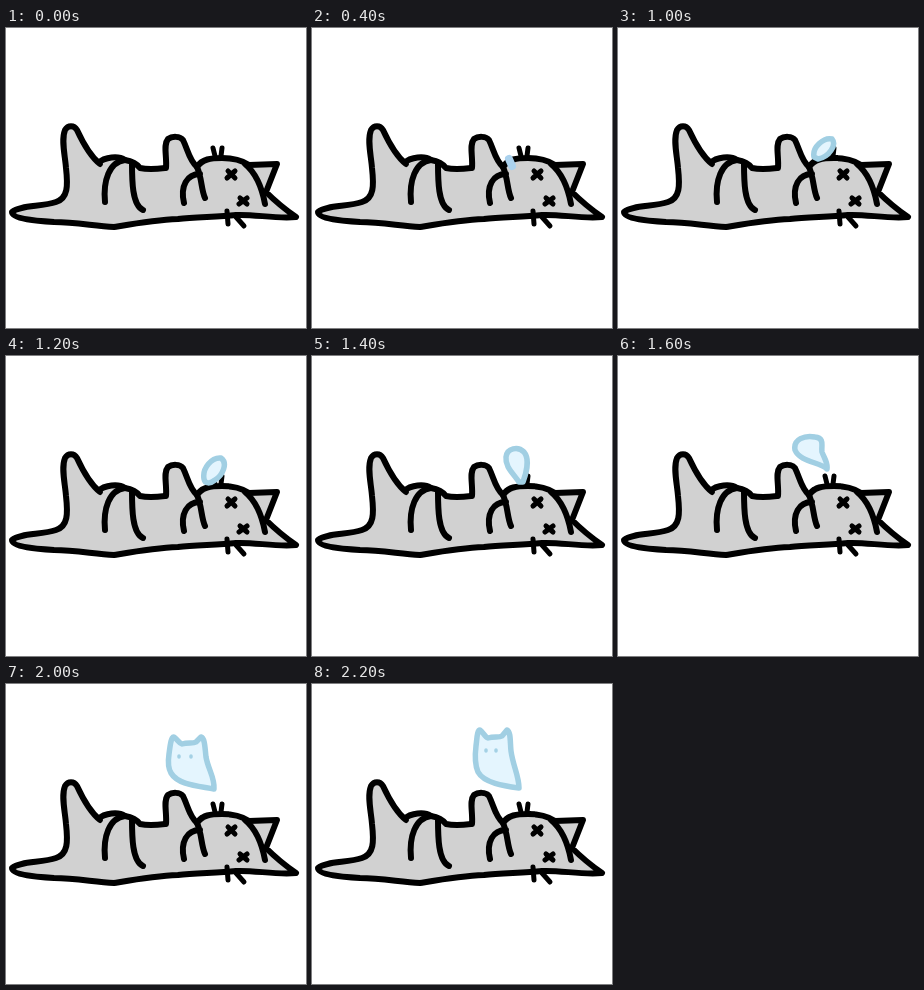
Animation of 300 by 300 pixels, one loop 2400 ms. Source, as an HTML page:

```html
<!DOCTYPE html>
<html lang="en">
<head>
<meta charset="utf-8">
<title>Sleepy ghost cat</title>
<style>
html, body { margin: 0; width: 100%; height: 100%; overflow: hidden; background: #fff; }
svg { display: block; width: 100vw; height: 100vh; }
path { stroke-linecap: round; stroke-linejoin: round; }
.line { fill: none; stroke: #000; stroke-width: 6; }
.body { fill: #d1d1d1; }
.thin { stroke-width: 5; }
</style>
</head>
<body>
<svg viewBox="0 0 300 300">
  <path class="line body" d="M6 184C14 177 36 179 50 174C62 170 62 158 60 140C59 127 55 112 59 102C62 97 68 97 71 102C77 115 84 128 94 136C90 132 110 126 119 132C125 133 131 136 134 140C143 142 151 141 160 140C161 128 157 117 162 111C166 108 174 108 177 112C182 122 183 132 191 139C196 131 205 130 216 130C228 130 237 133 243 137L271 136L260 164C270 174 280 182 290 189C270 191 248 186 230 187C210 189 188 189 172 191C148 192 126 196 108 199C88 198 70 194 48 194C32 193 6 191 6 184Z"/>
  <path class="line" d="M99 174C97 153 103 134 119 132M126 135C126 152 126 177 137 182M178 175C174 158 181 146 194 146M191 139C196 150 195 161 199 170M239 136C250 145 256 160 259 176"/>
  <path class="line thin" d="M207 120L209 128M216 120L215 128M221 183L222 196M230 189L238 198M222 143L229 150M229 143L221 150M234 170L241 176M241 170L233 176"/>
  <path id="soul"/>
  <path id="eyes" fill="none" stroke="#a4d1e5" stroke-width="3.5"/>
</svg>
<script>
const STEP = 200;
const BLUE = "#a1cfe3", PALE = "#e4f5fe", DROP = "#abd2ee";

// Each pose: outline, line width, line colour, fill, eye marks
const ghost = (d, eyes = "") => [d, 5.5, BLUE, PALE, eyes];
const drop = (d, width) => [d, width, DROP, DROP, ""];
const poses = [
  ["", 0, "none", "none", ""],
  drop("M202 138L203 141", 5),
  drop("M197 131L200 138", 8),
  ["M196 134C194 127 198 121 202 121C206 124 202 132 199 137Z", 4, DROP, PALE, ""],
  ghost("M195 132C193 123 203 113 209 115C213 119 208 128 200 132Z"),
  ghost("M196 129C194 119 206 109 214 111C219 117 211 129 200 131Z"),
  ghost("M198 123C196 112 206 101 215 102C222 107 217 119 209 124C204 128 199 128 198 123Z"),
  ghost("M207 126C201 117 193 111 194 101C195 92 206 90 212 96C218 103 214 118 211 126Z"),
  ghost("M209 113C202 106 182 106 177 94C175 83 187 79 197 81C207 82 203 90 204 96C206 102 210 106 209 113Z"),
  ghost("M167 72C167 65 172 61 176 62C179 63 181 67 185 68C191 68 195 64 201 63C203 67 201 73 203 80C205 89 211 98 207 104C196 103 180 98 173 89C169 83 167 79 167 72Z", "M174 74V75M189 76V77"),
  ghost("M163 70C164 63 165 52 168 53C171 55 173 59 176 60C182 58 187 60 190 58L195 53C199 54 199 65 200 73C202 85 209 94 208 105C193 102 172 101 165 89C162 84 162 77 163 70Z", "M173 72V73M185 72V73"),
  ghost("M164 62C165 55 165 46 168 46C171 48 173 53 176 54C182 52 187 54 190 52L195 46C199 48 198 58 199 67C201 82 207 92 207 104C192 102 172 99 166 88C163 81 163 70 164 62Z", "M174 66V67M184 66V67")
];

const soul = document.getElementById("soul");
const eyes = document.getElementById("eyes");
const set = (el, attrs) => {
  for (const key in attrs) el.setAttribute(key, attrs[key]);
};

let start = null;
let shown = -1;

function draw(now) {
  if (start === null) start = now;
  const i = Math.floor((now - start) / STEP) % poses.length;
  if (i !== shown && i >= 0) {
    const [d, width, stroke, fill, marks] = poses[i];
    set(soul, { d, stroke, fill, "stroke-width": width });
    set(eyes, { d: marks });
    shown = i;
  }
  requestAnimationFrame(draw);
}
requestAnimationFrame(draw);
</script>
</body>
</html>
```
